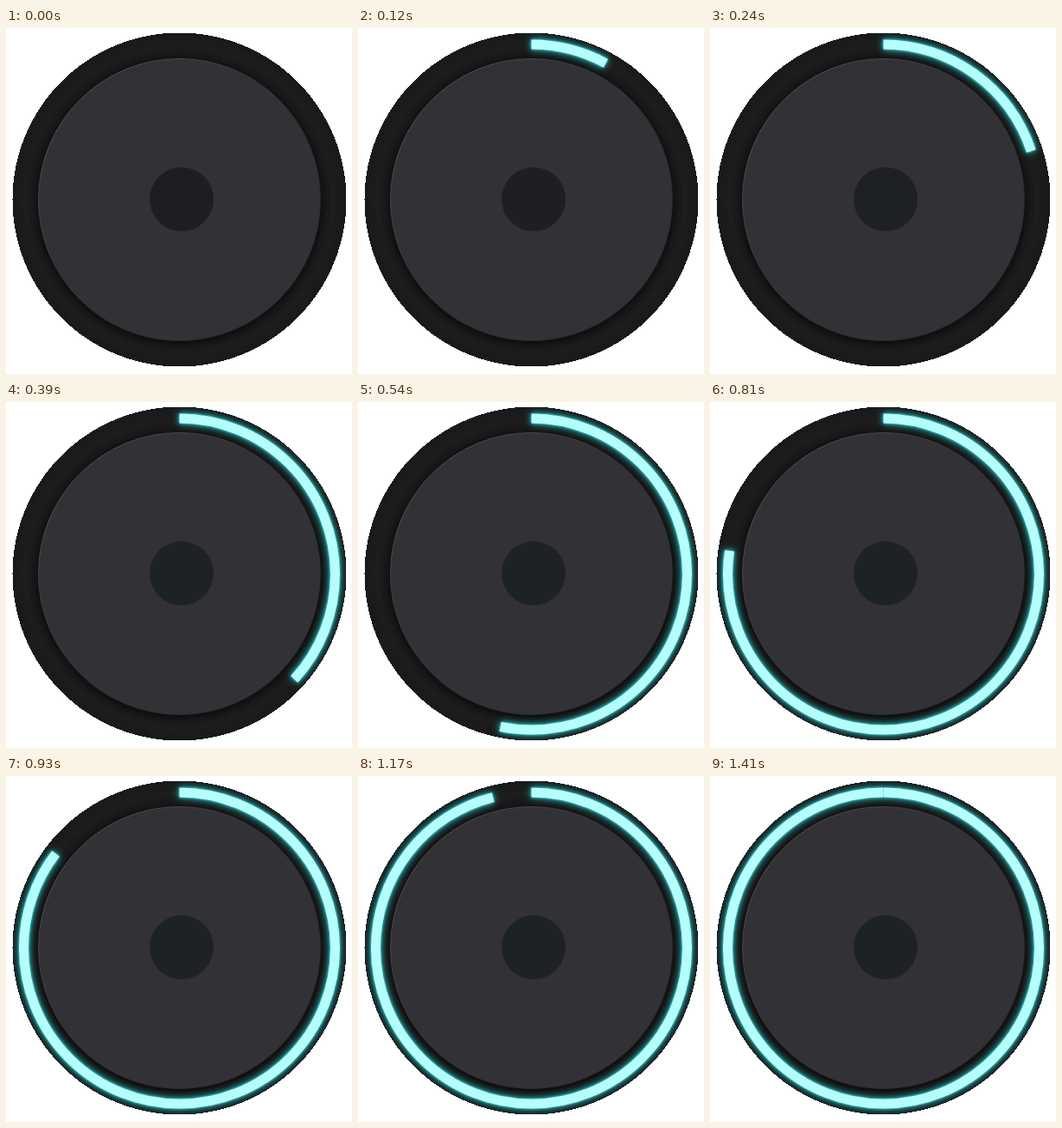
An HTML page that plays this animation: 400 px wide and 400 px high, repeating every 1.44 s.

```html
<!DOCTYPE html>
<html lang="en">
<head>
<meta charset="utf-8">
<title>Progress ring</title>
<style>
  html, body { margin: 0; width: 100%; height: 100%; overflow: hidden; background: #fff; }
  svg { display: block; width: 100vw; height: 100vh; }
  #arc { filter: drop-shadow(0 0 1.5px #3fe6e4) drop-shadow(0 0 4px #25b9ba); }
  #face { filter: drop-shadow(0 2px 5px #0009); }
</style>
</head>
<body>
<svg viewBox="0 0 400 400">
  <defs>
    <linearGradient id="rim" x1="0" y1="0" x2="1" y2="1">
      <stop offset=".1" stop-color="#555459"/>
      <stop offset=".5" stop-color="#323136"/>
      <stop offset=".9" stop-color="#29282d"/>
    </linearGradient>
    <radialGradient id="base">
      <stop offset=".84" stop-color="#161617"/>
      <stop offset=".92" stop-color="#1d1d1e"/>
      <stop offset="1" stop-color="#19191a"/>
    </radialGradient>
    <clipPath id="disc"><circle cx="200.5" cy="198.5" r="193"/></clipPath>
  </defs>
  <circle cx="200.5" cy="198.5" r="193" fill="url(#base)" shape-rendering="crispEdges"/>
  <circle id="face" cx="200.5" cy="198.5" r="163" fill="#323136" stroke="url(#rim)"/>
  <circle id="badge" cx="203" cy="198" r="37"/>
  <g clip-path="url(#disc)">
    <path id="arc" d="M200.5 19a180 180 0 0 1 0 360a180 180 0 0 1 0-360"
          pathLength="360" fill="none" stroke="#b5fefb" stroke-width="11"/>
  </g>
</svg>
<script>
  const DURATION = 1440, STEP = 30;
  const arc = document.getElementById('arc');
  const badge = document.getElementById('badge');

  const bezier = (u, a, b) => 3 * u * (1 - u) ** 2 * a + 3 * u * u * (1 - u) * b + u ** 3;

  // Cubic-bezier easing (.21, .12, .48, 1), solved by bisection
  function ease(x) {
    let low = 0, high = 1;
    for (let i = 0; i < 24; i++) {
      const mid = (low + high) / 2;
      if (bezier(mid, .21, .48) < x) low = mid; else high = mid;
    }
    return bezier(low, .12, 1);
  }

  function draw() {
    const time = Math.floor(performance.now() % DURATION / STEP) * STEP;
    const progress = time ? ease(time / DURATION) : 0;
    const tint = Math.min(1, progress * 3);
    arc.style.visibility = time ? 'visible' : 'hidden';
    arc.setAttribute('stroke-dasharray', `${progress * 360} 400`);
    badge.setAttribute('fill', `rgb(29, ${30 + 4 * tint}, ${34 + 4 * tint})`);
    requestAnimationFrame(draw);
  }
  draw();
</script>
</body>
</html>
```
